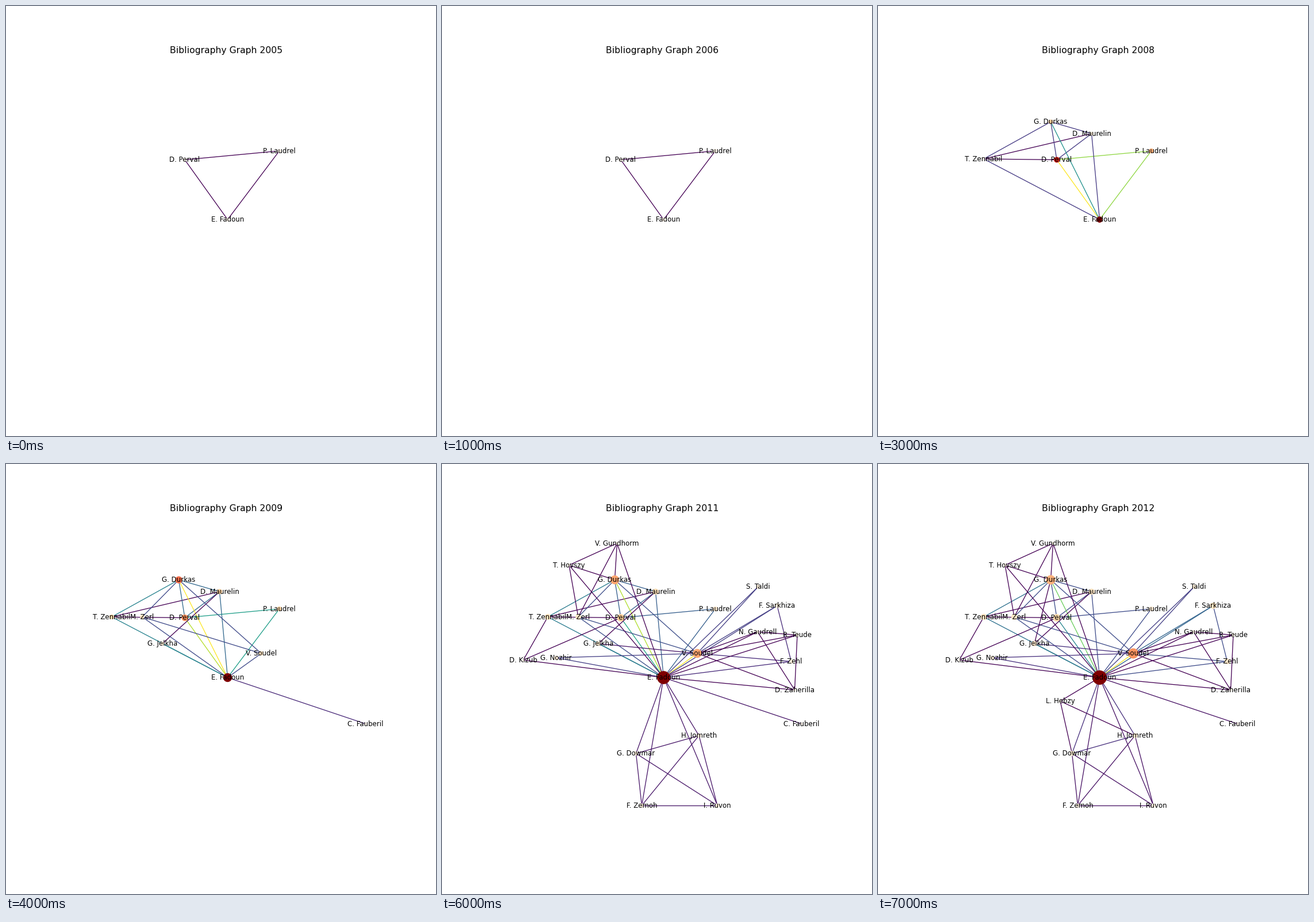
Animation, 748 px wide and 748 px high, one loop 8 s. Source, as a matplotlib script:

```python
import matplotlib.pyplot as plt
from matplotlib.animation import FuncAnimation
from matplotlib.collections import LineCollection

SIZE = 748
START = 2005
YEARS = 8

# key: label, x, y
PEOPLE = {
    "a": ("D. Perval", 311, 267.5),
    "b": ("P. Laudrel", 475.5, 252),
    "c": ("E. Fadoun", 385.5, 371.5),
    "d": ("G. Durkas", 300.5, 201.5),
    "e": ("D. Maurelin", 371.5, 222),
    "f": ("T. Zennabil", 184, 266),
    "g": ("M. Zerl", 237, 266),
    "h": ("G. Jelkha", 272, 312.5),
    "i": ("V. Soudel", 444, 329.5),
    "j": ("C. Fauberil", 625.5, 452),
    "k": ("S. Taldi", 550, 213.5),
    "l": ("F. Sarkhiza", 583, 246.5),
    "m": ("G. Nozhir", 198.5, 337),
    "n": ("F. Zehl", 607.5, 343.5),
    "o": ("H. Jomreth", 447, 472.5),
    "p": ("G. Dowmar", 337.5, 503.5),
    "q": ("F. Zemoh", 347.5, 594),
    "r": ("I. Ruvon", 479, 594),
    "s": ("V. Gundhorm", 304.5, 138),
    "t": ("T. Hovszy", 221, 176),
    "u": ("D. Kizub", 141.5, 341),
    "v": ("N. Gaudrell", 549, 292),
    "w": ("R. Teude", 618, 297.5),
    "x": ("D. Zaherilla", 613.5, 393),
    "y": ("L. Hebzy", 317, 412.5),
}

# first year, linked pairs, weight per year (the last one persists)
LINKS = [
    (2005, "ab bc", [3, 4, 5, 6]),
    (2005, "ac", [3, 4, 5, 7, 9, 10, 11]),
    (2008, "fe fa", [1]),
    (2008, "de da ea ec", [2, 4, 5, 6]),
    (2008, "fd fc", [2, 5, 6, 8, 9]),
    (2008, "cd", [4, 10, 14, 16, 18]),
    (2009, "he", [1]),
    (2009, "hc", [5, 6, 8, 10]),
    (2009, "dg gc gi di", [3, 4, 5, 6]),
    (2009, "ic", [3, 8, 18, 23]),
    (2009, "jc", [2]),
    (2010, "kc ki", [1, 4, 5]),
    (2010, "lc li", [3, 4, 8]),
    (2010, "ln nc ni", [1, 3, 6]),
    (2010, "mc mi", [1, 4]),
    (2010, "oc pc op", [1, 2, 4]),
    (2010, "oq or pq pr qr qc rc", [1, 2]),
    (2011, "hi", [2, 4]),
    (2011, "ua uf uc st sd sg sc td tg tc", [1]),
    (2011, "vi vc vw vx wi wc wx xi xc", [1]),
    (2012, "yc yo yp hd", [1]),
]


def weights(year):
    """Weight of every pair linked by the given year."""
    found = {}
    for first, pairs, history in LINKS:
        if year >= first:
            w = history[min(year - first, len(history) - 1)]
            found.update((pair, w) for pair in pairs.split())
    return found


def spot(key):
    return PEOPLE[key][1:]


fig = plt.figure(figsize=(8, 8), dpi=SIZE / 8, facecolor="white")
ax = fig.add_axes([0, 0, 1, 1])
plt.rcParams["font.family"] = "DejaVu Sans"


def draw(frame):
    year = START + frame
    ax.clear()
    ax.set_axis_off()
    ax.set_xlim(0, SIZE)
    ax.set_ylim(SIZE, 0)

    links = weights(year)
    strength = {}
    for pair, w in links.items():
        for key in pair:
            strength[key] = strength.get(key, 0) + w

    lines = LineCollection([[spot(p), spot(q)] for p, q in links],
                           cmap="viridis", linewidths=1, zorder=1)
    lines.set_array(list(links.values()))
    ax.add_collection(lines, autolim=False)

    xs, ys = zip(*(spot(key) for key in strength))
    values = list(strength.values())
    ax.scatter(xs, ys, s=[2.5 * v for v in values], c=values,
               cmap="OrRd", linewidths=1, zorder=2)

    for key in strength:
        label, x, y = PEOPLE[key]
        ax.text(x, y, label, size=9, ha="center", va="center", zorder=3)
    ax.text(0.5125 * SIZE, 82, f"Bibliography Graph {year}",
            size=12, ha="center", va="baseline")
    return []


anim = FuncAnimation(fig, draw, frames=YEARS, init_func=lambda: draw(0),
                     interval=1000, repeat=True, repeat_delay=0)
plt.show()
```
